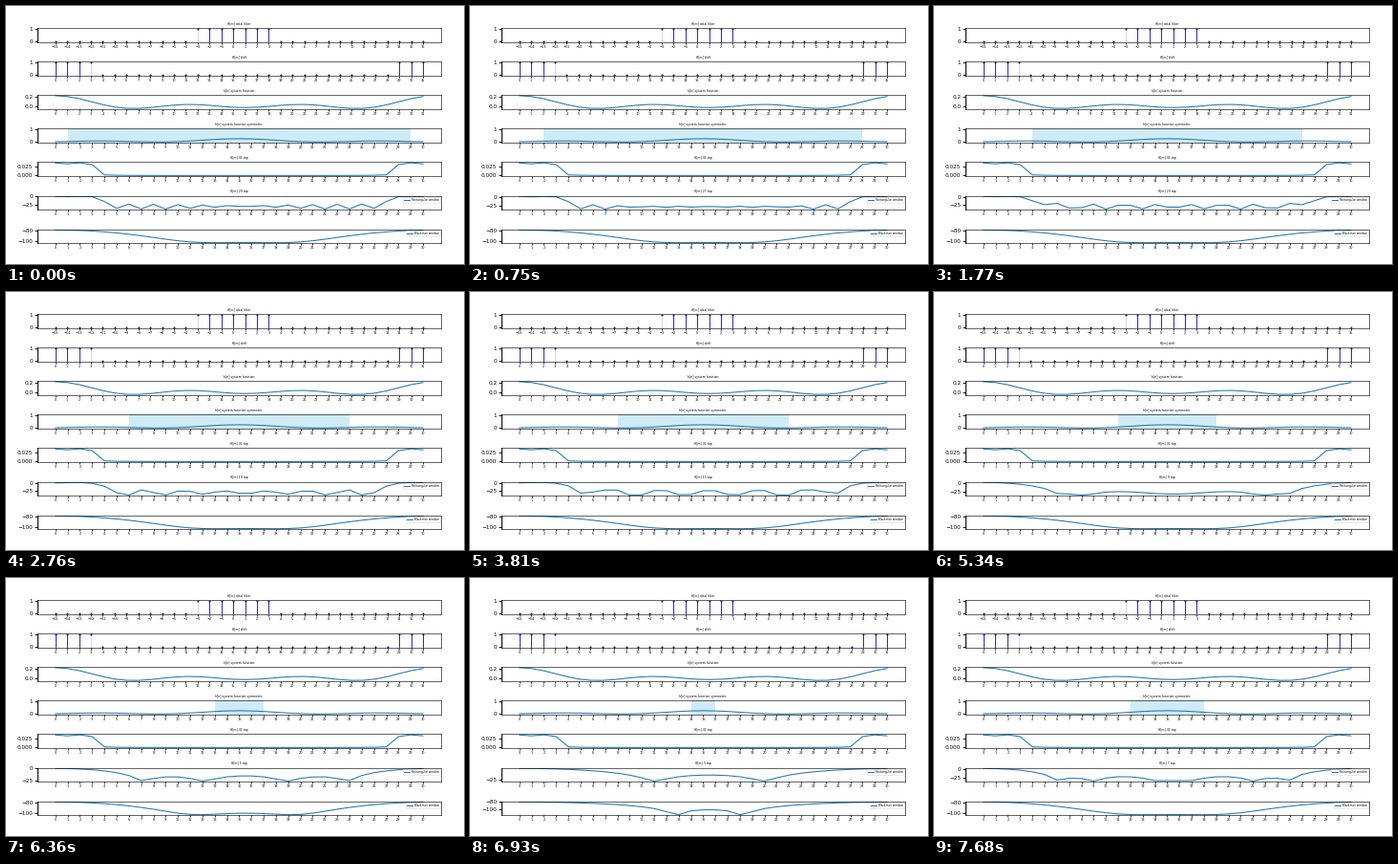
A matplotlib script that plays this animation: 480x270 px, repeating every 8000 ms.

```python
import numpy as np
import matplotlib.pyplot as plt
from matplotlib.animation import FuncAnimation
from matplotlib.patches import Rectangle

W, H, DPI = 480, 270, 100
LOOP, STEP = 8000, 40
PX = 72 / DPI
LEFT, RIGHT, TOP, HEIGHT, PITCH = 32.5, 456.3, 23.0, 14.6, 35.12
BLUE = "#1f77b4"

# (start in ms, number of taps)
STAGES = [(0, 29), (750, 27), (1290, 25), (1770, 23), (2280, 21), (2760, 19),
          (3120, 17), (3810, 15), (4200, 13), (4650, 11), (5340, 9),
          (5850, 7), (6360, 5), (6870, 3), (7320, 5), (7680, 7)]

fig = plt.figure(figsize=(W / DPI, H / DPI), dpi=DPI, facecolor="white")


def panel(row, title, first, count, yticks):
    top = TOP + row * PITCH
    ax = fig.add_axes([LEFT / W, 1 - (top + HEIGHT) / H,
                       (RIGHT - LEFT) / W, HEIGHT / H])
    span = count - 1
    ax.set_xlim(-0.05 * span, 1.05 * span)
    ax.set_xticks([])
    ax.set_yticks(yticks)
    ax.tick_params(axis="y", labelsize=5.8 * PX, length=2.6 * PX,
                   width=0.9 * PX, pad=1.6 * PX)
    for side, spine in ax.spines.items():
        spine.set_linewidth((1.0 if side == "left" else 0.6) * PX)
    trans = ax.get_xaxis_transform()
    ax.plot(range(count), [0] * count, ls="", marker=3, ms=2.2 * PX,
            mew=0.8 * PX, color="k", transform=trans, clip_on=False)
    for i in range(count):
        ax.text(i, -4.9 / HEIGHT, f"{first + i}".replace("-", "\u2212"),
                transform=trans, size=3.5 * PX, ha="center", va="center")
    label = ax.text(0.5, 1 + 4.4 / HEIGHT, title, transform=ax.transAxes,
                    size=3.1 * PX, ha="center", va="center")
    return ax, label


def fit_y(ax, y):
    lo, hi = np.min(y), np.max(y)
    pad = 0.05 * (hi - lo)
    ax.set_ylim(lo - pad, hi + pad)


def curve(ax, y, **kw):
    fit_y(ax, y)
    return ax.plot(y, color=BLUE, lw=1.05 * PX, **kw)[0]


def stems(ax, y, faint):
    ax.set_ylim(-0.05, 1.05)
    for i in np.flatnonzero(y):
        ax.plot([i, i], [0, 1], color="#1010e0", lw=0.9 * PX,
                alpha=0.2 if i == faint else 1)
    ax.plot(y, ls="", marker="o", ms=2.0 * PX, mew=0, color="#101080",
            clip_on=False)


def impulse(size, edge=0.0):
    """Low-pass impulse response from seven unit samples and one edge sample."""
    n = np.arange(size)[:, None]
    k = np.arange(1, 5)
    gain = np.array([1, 1, 1, edge])
    return (1 + 2 * (gain * np.cos(2 * np.pi * n * k / size)).sum(1)) / size


m = np.arange(31)
h = impulse(32)
h_sym = h[np.abs(m - 15)]
omega = 2 * np.pi * m / 31
basis = np.cos(np.outer(omega, np.arange(16)))

rect_coef = 2 * impulse(31, 0.1)[:16]
rect_coef[0] = rect_coef[0] / 2 + 1 / 31
soft_coef = np.zeros(16)
soft_coef[:4] = 0.219, 0.26, 0.09, 0.009
soft_coef *= 2e-4


def rect_db(taps):
    half = taps // 2 + 1
    amp = basis[:, :half] @ rect_coef[:half]
    floor = np.clip(1.1 / taps ** 2, 0.012, 0.045)
    return 10 * np.log10(amp ** 2 + floor ** 2)


def soft_db(taps):
    half = taps // 2 + 1
    return 20 * np.log10(np.abs(basis[:, :half] @ soft_coef[:half]) + 1e-7)


pos = np.arange(32)
ax, _ = panel(0, "H[m] ideal filter", -15, 32, [0, 1])
stems(ax, (np.abs(pos - 15) <= 3).astype(float), 12)

ax, _ = panel(1, "H[m] shift", 0, 32, [0, 1])
stems(ax, ((pos <= 3) | (pos >= 29)).astype(float), 3)

ax, _ = panel(2, "h[n] system function", 0, 32, [0, 0.2])
curve(ax, h)

ax, _ = panel(3, "h[n] system function symmetric", 0, 31, [0, 1])
curve(ax, h_sym)
ax.set_ylim(-0.1025, 1.0525)
band = Rectangle((0, 0), 1, 1, transform=ax.get_xaxis_transform(),
                 fc="skyblue", alpha=0.4, lw=0)
ax.add_patch(band)

ax, _ = panel(4, "H[m] 31 tap", 0, 31, [0, 0.025])
curve(ax, np.abs(np.fft.fft(h_sym)) / 31)

rect_ax, rect_title = panel(5, "", 0, 31, [-25, 0])
rect_line = curve(rect_ax, rect_db(29), label="Rectangular window")
soft_ax, _ = panel(6, "", 0, 31, [-100, -80])
soft_line = curve(soft_ax, soft_db(29), label="Blackman window")
for ax in (rect_ax, soft_ax):
    box = ax.legend(loc="upper right", fontsize=2.9 * PX)
    box.get_frame().set_linewidth(0.5 * PX)


def update(i):
    t = (i + 1) * STEP - 1
    taps = [n for start, n in STAGES if start <= t][-1]
    band.set_x(15 - taps // 2)
    band.set_width(taps - 1)
    rect_title.set_text(f"H[m] {taps} tap")
    for ax, line, y in ((rect_ax, rect_line, rect_db(taps)),
                        (soft_ax, soft_line, soft_db(taps))):
        line.set_ydata(y)
        fit_y(ax, y)
    return band, rect_title, rect_line, soft_line


anim = FuncAnimation(fig, update, frames=LOOP // STEP, interval=STEP,
                     repeat=True, repeat_delay=0, blit=False)
plt.show()
```
